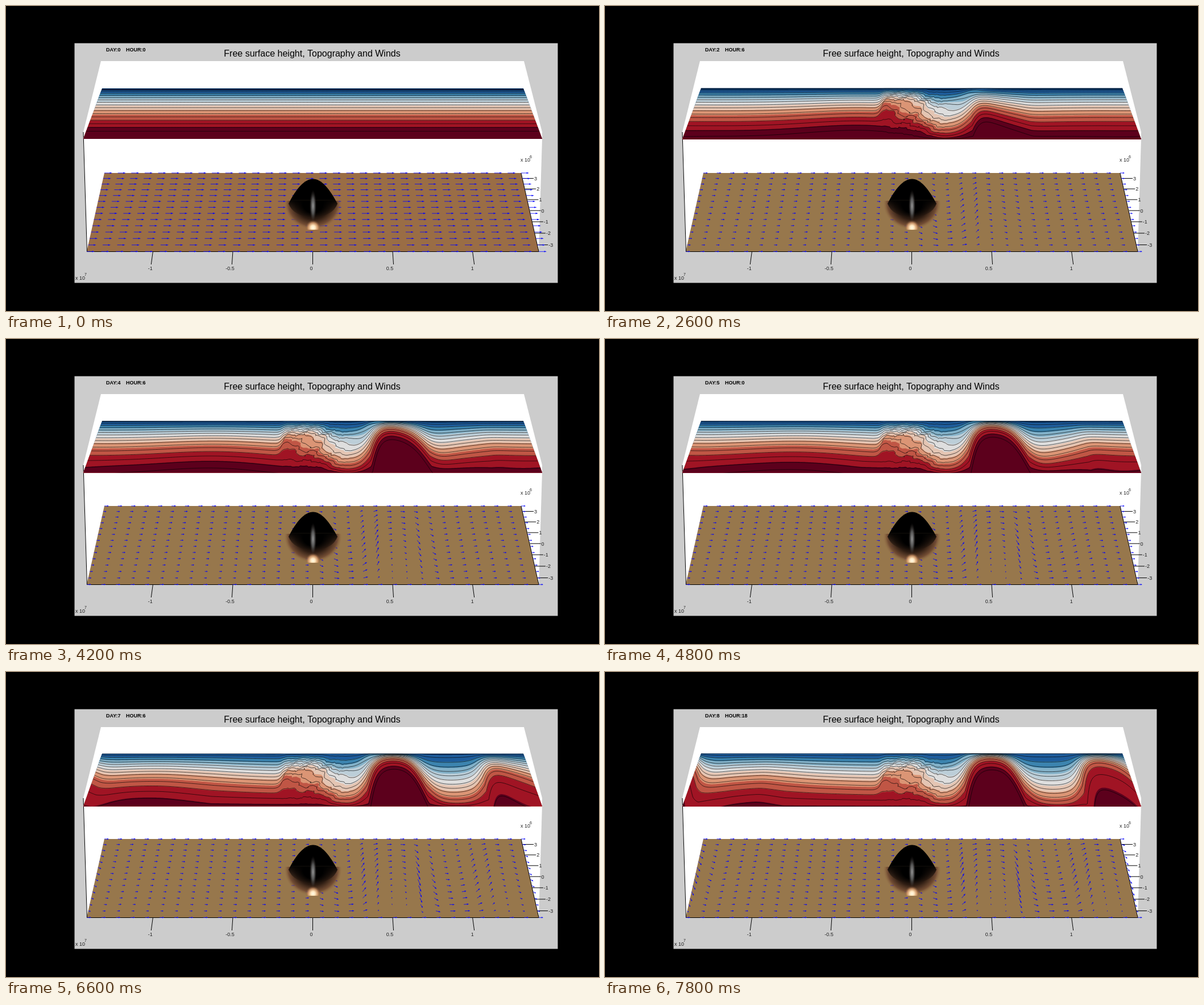
Write an HTML page with a canvas that moves like this. It is 1043x537 px and loops after 8000 ms.

```html
<!DOCTYPE html>
<html lang="en">
<head>
<meta charset="utf-8">
<title>Free surface height, Topography and Winds</title>
<style>
html, body { margin: 0; width: 100%; height: 100%; overflow: hidden; background: #000; }
canvas { display: block; }
</style>
</head>
<body>
<canvas id="stage" width="1043" height="537"></canvas>
<script>
const ctx = document.getElementById('stage').getContext('2d');
const FONT = 'Arial, "Liberation Sans", sans-serif';
const COLORS = ['#042b57', '#1e5c9b', '#3c84af', '#83b1c8', '#bcced8', '#dedede',
  '#e4c5b3', '#db9575', '#c05645', '#a01424', '#5c001c'];
const LAST_STEP = 35;

const lerp = (a, b, k) => a + (b - a) * k;
const clamp = (v, lo = 0, hi = 1) => Math.max(lo, Math.min(hi, v));
const gauss = v => Math.exp(-v * v);
const sigmoid = v => 1 / (1 + Math.exp(-v));

// Resting depth of colour edges and contour lines, 0 = back edge, 1 = front edge
const colorDepth = i => .045 + .05 * i + .00037 * i ** 3;
const lineDepth = i => .03 + .032 * i + .0015 * i * i;

// Wave height at s (0..1 along x): a wave train spreads from the hill
// to the right and re-enters on the left, a low swell runs upstream.
function waveAt(s, step) {
  const grow = Math.min(1, step / 3);
  const q = s < .47 ? s + 1 : s;
  const ridge = .706 - .0006 * step;
  const crest = -Math.tanh(1.5 * Math.cos(2 * Math.PI * (q - ridge) / .265)) / Math.tanh(1.5);
  const reach = sigmoid((.53 + .0143 * step - q) / .045) * sigmoid((q - .53) / .014);
  const train = crest * (crest < 0 ? 38 : 27) * reach;
  const upstream = sigmoid((.48 - s) / .02);
  const swell = -8 * gauss((s - .5 + .0125 * step) / .17) + 18 * s * step / LAST_STEP;
  return grow * (train + upstream * swell);
}

// Depth of one contour at s, after drift, wave and the bump over the hill
function depthAt(level, s, wave, step) {
  const p = step / LAST_STEP, rel = level / .764;
  const wrap = Math.abs((s - .95 + 1.5) % 1 - .5);
  let u = level + p * (.21 * rel ** 5 - .06 * (1 - level) ** 9)
    + .9 * p ** 4 * gauss(wrap / .07) * rel ** 12;
  u = Math.max(0, u);
  u += wave < 0 ? u * wave / 45 * (1.12 - .24 * Math.min(u, 1))
    : wave / 89 * 4 * u * Math.max(0, 1 - u);
  const right = Math.max(.46, .47 + .45 * (.52 - level));
  const plateau = sigmoid((s - .43) / .004) * sigmoid((right - s) / .008);
  const weight = Math.min(1, level / .5) * clamp((.75 - level - .08 * p) / .1);
  return clamp(u - Math.min(1, step / 3) * .21 * weight * plateau, 0, 1.2);
}

function contour(level, step, back, front) {
  const points = [];
  for (let i = 0; i <= 320; i++) {
    const s = i / 320;
    const u = depthAt(level, s, waveAt(s, step), step);
    const x = lerp(169 - 33 * u, 910 + 33 * u, s);
    const rough = Math.min(1, step / 3) * Math.exp(-(((x - 544) / 52) ** 4)) * Math.sin(Math.PI * clamp(u));
    points.push([
      x + rough * 4 * Math.sin(.4 * x + 30 * level),
      lerp(back, front, u) + rough * (2.2 * Math.sin(.22 * x + 20 * level) + 1.4 * Math.sin(.7 * x - 25 * level))
    ]);
  }
  return points;
}

function poly(points, fill) {
  ctx.beginPath();
  points.forEach(p => ctx.lineTo(...p));
  ctx.closePath();
  ctx.fillStyle = fill;
  ctx.fill();
}

function line(x1, y1, x2, y2) {
  ctx.beginPath();
  ctx.moveTo(x1, y1);
  ctx.lineTo(x2, y2);
  ctx.stroke();
}

function text(str, x, y, size = 9, align = 'left', color = '#222', weight = '') {
  ctx.font = `${weight} ${size}px ${FONT}`;
  ctx.textAlign = align;
  ctx.fillStyle = color;
  ctx.fillText(str, x, y);
}

function drawSurface(step) {
  const p = step / LAST_STEP, back = 145 - 1.5 * p, front = 234 + 3 * p;
  ctx.save();
  poly([[169, back], [910, back], [943, front], [136, front]], COLORS[0]);
  ctx.clip();
  COLORS.slice(1).forEach((color, i) => {
    const edge = contour(colorDepth(i), step, back, front);
    poly([...edge, [975, front + 20], [104, front + 20]], color);
  });
  ctx.strokeStyle = 'rgba(0,0,0,.8)';
  ctx.lineWidth = .8;
  for (let i = 0; i < 16; i++) {
    ctx.beginPath();
    contour(lineDepth(i), step, back, front).forEach(q => ctx.lineTo(...q));
    ctx.stroke();
  }
  ctx.restore();
}

function arrow(x, y, dx, dy) {
  const len = Math.hypot(dx, dy);
  if (len < .8) return;
  const ux = dx / len, uy = dy / len, head = Math.min(4.5, len * .3 + .8);
  const bx = x + dx - ux * head, by = y + dy - uy * head;
  line(x, y, bx, by);
  poly([[x + dx, y + dy], [bx - uy * 1.3, by + ux * 1.3], [bx + uy * 1.3, by - ux * 1.3]], '#00f');
}

// Winds follow the contours of the surface above
function drawWinds(step) {
  ctx.strokeStyle = '#00f';
  ctx.lineWidth = .8;
  const speed = 5.8 + 8.2 * Math.exp(-step / 3);
  for (let row = 0; row < 14; row++) {
    const y = 294 + 9.6 * row + .08 * row * row, v = (y - 294) / 138.3;
    const edge = row === 0 || row === 13;
    for (let col = 0; col < 32; col++) {
      const s = col / 31;
      const slope = (waveAt(s + .01, step) - waveAt(s - .01, step)) / (.02 * 774);
      const dx = edge ? Math.max(8, speed) : speed * (1 + waveAt(s, step) / 22 * (v - .35));
      const dy = edge ? 0 : speed * 1.4 * slope * Math.sin(Math.PI * v);
      arrow(lerp(173 - 31 * v, 906 + 31 * v, s), y, dx, dy);
    }
  }
}

// Soft ellipse, drawn only below the line y = top
function glow(x, y, rx, ry, top, stops) {
  ctx.save();
  ctx.beginPath();
  ctx.rect(x - rx, top, 2 * rx, 394 - top);
  ctx.clip();
  ctx.translate(x, y);
  ctx.scale(rx, ry);
  const g = ctx.createRadialGradient(0, 0, 0, 0, 0, 1);
  stops.forEach(([at, color]) => g.addColorStop(at, color));
  ctx.fillStyle = g;
  ctx.fillRect(-1, -1, 2, 2);
  ctx.restore();
}

function drawHill() {
  glow(540, 348, 51, 46, 343, [[0, '#000'], [.35, '#000'], [.6, 'rgb(45,28,18)'],
    [.85, 'rgba(112,74,50,.95)'], [1, 'rgba(150,112,72,0)']]);
  const shade = ctx.createLinearGradient(0, 340, 0, 372);
  shade.addColorStop(0, '#000');
  shade.addColorStop(1, 'rgba(0,0,0,0)');
  ctx.fillStyle = shade;
  ctx.beginPath();
  ctx.moveTo(497, 348);
  ctx.bezierCurveTo(510, 322, 525, 304.5, 540, 304.5);
  ctx.bezierCurveTo(555, 304.5, 569, 322, 583, 348);
  ctx.quadraticCurveTo(575, 370, 540, 372);
  ctx.quadraticCurveTo(505, 370, 497, 348);
  ctx.fill();
  glow(540, 352, 6, 28, 320, [[0, 'rgba(160,160,160,.95)'], [.5, 'rgba(115,115,115,.7)'], [1, 'rgba(60,50,45,0)']]);
  glow(540, 390, 13, 13, 365, [[0, '#fffbe8'], [.3, '#ffe6bd'], [.65, 'rgba(225,165,115,.75)'], [1, 'rgba(130,85,55,0)']]);
}

function drawAxes() {
  ctx.strokeStyle = '#000';
  ctx.lineWidth = 1;
  line(136, 222, 142.5, 432.5);
  line(142, 432.5, 937, 432.5);
  line(906, 294, 937, 432);
  for (let i = -2; i <= 2; i++) {
    const x = 539.5 + 140.6 * i;
    line(x, 433, x + 1.5 * i, 455);
    text(i / 2, x - 2.5 + (i % 2 ? -2.5 : i), 465, 9, 'center');
  }
  for (let i = 0; i < 7; i++) {
    const x = 909 + 4.2 * i, y = 303.5 + 18.3 * i + .2 * i * i;
    line(x, y, x + 19, y);
    text(3 - i, x + 20, y + 3.3);
  }
  text('x 10', 122, 482);
  text('7', 138, 475, 7);
  text('x 10', 905, 274);
  text('6', 921, 268, 7);
}

function draw(step) {
  ctx.fillStyle = '#000';
  ctx.fillRect(0, 0, 1043, 537);
  ctx.fillStyle = '#ccc';
  ctx.fillRect(120.5, 65.5, 850, 422);
  poly([[167, 97], [911, 97], [943, 222], [943, 234], [937, 432], [142, 432], [136, 234], [136, 222]], '#fff');
  poly([[173, 294], [906, 294], [937, 432], [142, 432]], step ? '#97774c' : '#9a6d45');
  drawAxes();
  drawSurface(step);
  drawWinds(step);
  drawHill();
  text('Free surface height, Topography and Winds', 538.5, 89, 16, 'center', '#000');
  text('DAY:' + Math.floor(step / 4), 176, 79.5, 9, 'left', '#000', 'bold');
  text('HOUR:' + step % 4 * 6, 211, 79.5, 9, 'left', '#000', 'bold');
}

let shown = -1;
function tick() {
  const t = performance.now() % 8000;
  const step = t < 1000 ? 0 : Math.floor((t - 800) / 200);
  if (step !== shown) draw(shown = step);
  requestAnimationFrame(tick);
}
tick();
</script>
</body>
</html>
```
